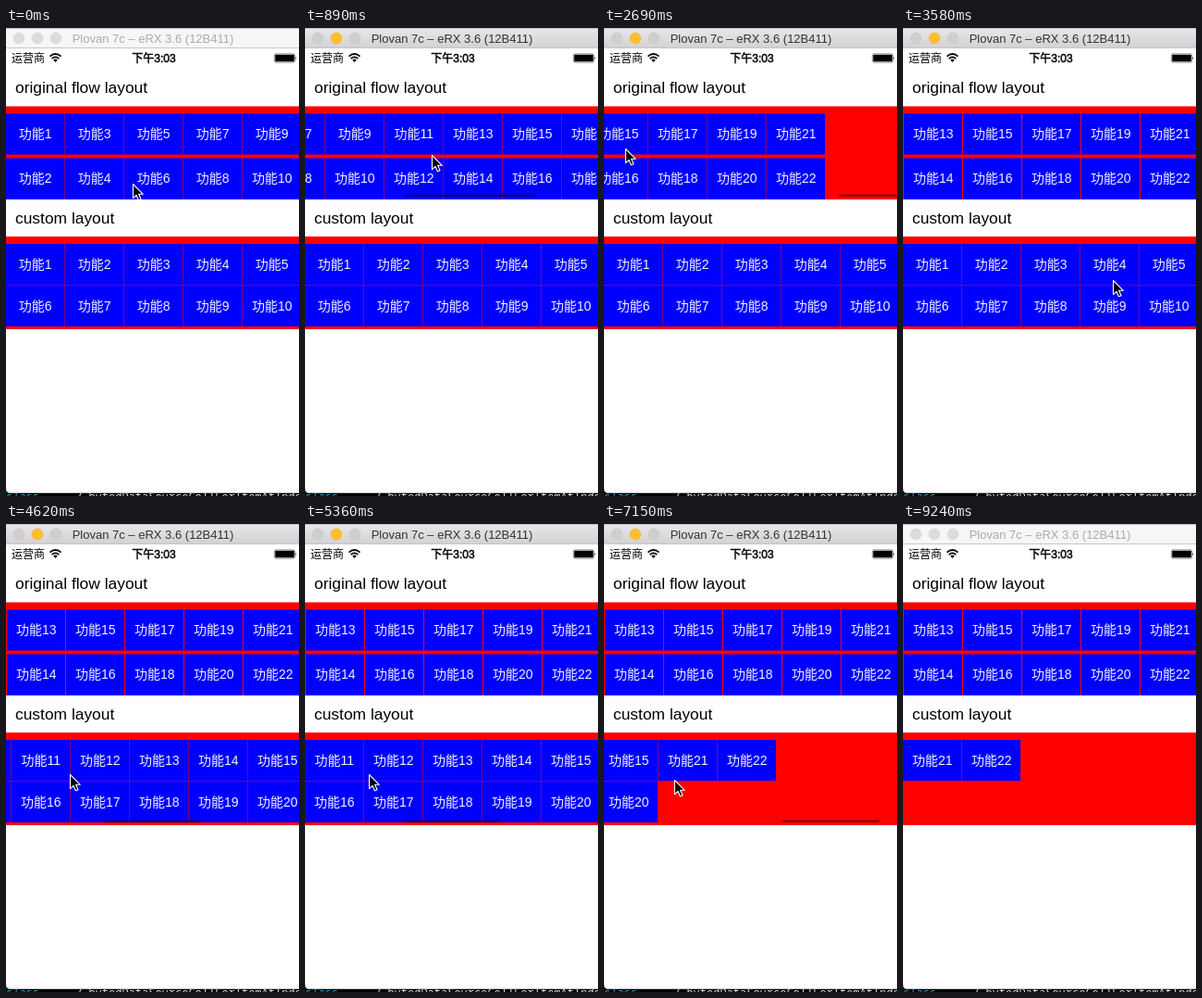
These frames come from a looping animation (317 px wide and 505 px high, 9340 ms). An HTML page:

```html
<!DOCTYPE html>
<html lang="zh-CN">
<head>
<meta charset="utf-8">
<title>Grid layouts</title>
<style>
html, body { margin: 0; width: 100%; height: 100%; overflow: hidden; background: #fff; }
svg { display: block; width: 317px; height: 505px; font-family: "Liberation Sans", "Noto Sans CJK SC", "Noto Sans CJK", sans-serif; }
.bar { fill: #f6f6f6; }
.title { font-size: 13px; fill: #ababab; text-anchor: middle; }
.light { fill: #dcdcdc; stroke: #d2d2d2; stroke-width: .5; }
.active .bar { fill: url(#chrome); }
.active .title { fill: #333; }
.active .light { fill: #d0ced0; stroke: #c2c0c2; }
.active .mid { fill: #fdbd2e; stroke: #f3b02a; }
.status { font-size: 12px; }
.label { font-size: 17.4px; }
.cell { font-size: 14px; font-weight: 300; fill: #f4f4ff; text-anchor: middle; }
.line { fill: #800080; }
.rest .line { fill: #f00; }
.code { font: 12px "Noto Sans Mono", monospace; }
</style>
</head>
<body>
<svg id="stage" viewBox="0 0 317 505">
  <defs>
    <linearGradient id="chrome" x2="0" y2="1">
      <stop stop-color="#e9e7e9"/><stop offset="1" stop-color="#d2d0d2"/>
    </linearGradient>
  </defs>
  <rect width="317" height="505" fill="#000"/>
  <g class="code">
    <text x="0" y="510" fill="#2aa5d8">class</text>
    <text x="75" y="510" fill="#ddd">7.bytedDataSourceCellForItemAtIndex</text>
  </g>
  <path d="M0 0H317V502H5Q0 502 0 497Z" fill="#fff"/>
  <path d="M0 497Q0 501.5 5 501.5H317" fill="none" stroke="#aaa" stroke-width=".7"/>
  <rect class="bar" width="317" height="22"/>
  <path d="M0 .5H317M0 21.5H317" stroke="#c6c6c6"/>
  <circle class="light" cx="14" cy="11" r="6"/>
  <circle class="light mid" cx="34" cy="11" r="6"/>
  <circle class="light" cx="54" cy="11" r="6"/>
  <text class="title" x="159" y="15.6">Plovan 7c – eRX 3.6 (12B411)</text>
  <g class="status">
    <text x="6" y="37">运营商</text>
    <text x="160" y="36.8" text-anchor="middle" stroke="#000" stroke-width=".45">下午3:03</text>
  </g>
  <path d="M47.5 30.6Q53.5 25.4 59.5 30.6M49.7 33Q53.5 29.7 57.3 33" fill="none" stroke="#000" stroke-width="1.7"/>
  <path d="M51.3 34.4Q53.5 32.6 55.7 34.4L53.5 37Z"/>
  <rect x="290.3" y="27.8" width="22.4" height="9.4" rx="1.8" fill="none" stroke="#555" stroke-width=".6"/>
  <rect x="291.2" y="28.7" width="20.6" height="7.6" rx=".8"/>
  <path d="M313.4 30.7Q315 32.5 313.4 34.3Z"/>
  <text class="label" x="10" y="70">original flow layout</text>
  <text class="label" x="10" y="210.5">custom layout</text>
  <rect y="84.5" width="317" height="100.5" fill="#f00"/>
  <rect y="225" width="317" height="100" fill="#f00"/>
  <g id="views"></g>
  <path id="cursor" d="M.5 .5V15.6L4 12.3L6.4 17.8L9 16.7L6.6 11.3H11.3Z" stroke="#fff" stroke-width="1.1" stroke-linejoin="round"/>
</svg>
<script>
const LOOP = 9340, STEP = 149, PAGE = 320, COUNT = 22, COLUMN = 64;
const stage = document.getElementById('stage');
const cursor = document.getElementById('cursor');
const root = document.getElementById('views');

function add(parent, tag, attrs, text) {
  const el = document.createElementNS('http://www.w3.org/2000/svg', tag);
  for (const key in attrs) el.setAttribute(key, attrs[key]);
  if (text) el.textContent = text;
  return parent.appendChild(el);
}

// Drags are press step, release step and resting offset; rows are top and height
const flow = {
  width: 704, end: 383, thumbY: 179.5,
  rows: [[92.5, 44], [140.5, 44.5]],
  place: n => [n >> 1, n % 2],
  drags: [[2, 5, 320], [15, 18, 383]]
};
const paged = {
  width: 960, thumbY: 319.5,
  rows: [[233, 44], [278, 44]],
  place: n => [Math.floor(n / 10) * 5 + n % 5, Math.floor(n % 10 / 5)],
  drags: [[24, 28, 320], [44, 47, 640]]
};
const views = [flow, paged];

for (const view of views) {
  view.group = add(root, 'g', {});
  const cells = Array.from({ length: COUNT }, (_, n) => view.place(n));
  const taken = (col, row) => cells.some(c => c[0] === col && c[1] === row);
  cells.forEach(([col, row], n) => {
    const x = col * COLUMN, [y, height] = view.rows[row];
    add(view.group, 'rect', { x, y, width: COLUMN - 1, height, fill: '#00f' });
    if (taken(col + 1, row)) add(view.group, 'rect', { x: x + COLUMN - 1, y, width: 1, height, class: 'line' });
    if (view === paged && taken(col, row + 1)) add(view.group, 'rect', { x, y: y + height, width: COLUMN, height: 1, class: 'line' });
    add(view.group, 'text', { x: x + 31.7, y: y + 26.9, class: 'cell' }, '功能' + (n + 1));
  });
  view.thumb = add(root, 'rect', { y: view.thumbY, height: 2.5, rx: 1.25, fill: '#000' });
}

// Pointer waypoints: step, x, y
const path = [
  [0, 137, 168], [2, 237, 138], [5, 137, 137], [10, 137, 137], [15, 281, 130],
  [18, 23, 130], [23, 195, 202], [24, 227, 272], [28, 69, 270], [36, 69, 270],
  [39, 304, 296], [43, 302, 295], [47, 76, 275], [49, 76, 276], [56, 90, 520], [64, 90, 520]
];

function pointer(k) {
  const i = path.findIndex(p => p[0] > k);
  const [from, ...a] = path[i - 1], [to, ...b] = path[i];
  return a.map((v, j) => Math.round(v + (b[j] - v) * (k - from) / (to - from)));
}

function rubber(offset, max) {
  const over = offset - max;
  return over > 0 ? max + PAGE * (1 - 1 / (over * .55 / PAGE + 1)) : offset;
}

function scroll(view, k) {
  const max = view.width - PAGE;
  let offset = 0, shown = false;
  for (const [press, release, target] of view.drags) {
    if (k < press) break;
    const drag = pointer(press)[0] - pointer(Math.min(k, release))[0];
    const held = rubber(offset + drag, max);
    const settle = held > max ? 4 : 8; // a bounce is quicker than paging
    const left = Math.max(0, 1 - Math.max(0, k - release) / settle);
    offset = k <= release ? held : target + (held - target) * left ** 7;
    shown = k > press && k <= release + settle;
  }
  return { offset: Math.round(offset), shown };
}

function draw(k) {
  stage.classList.toggle('active', k >= 2 && k < 62);
  for (const view of views) {
    const { offset, shown } = scroll(view, k);
    const max = view.width - PAGE, track = PAGE - 6;
    const over = Math.max(0, offset - max);
    view.group.setAttribute('transform', `translate(${-offset} 0)`);
    view.group.classList.toggle('rest', offset === view.end);
    view.thumb.setAttribute('x', 3 + Math.min(offset, max) / view.width * track + over);
    view.thumb.setAttribute('width', PAGE / view.width * track - over);
    view.thumb.setAttribute('opacity', shown ? .4 : 0);
  }
  cursor.setAttribute('transform', `translate(${pointer(k)})`);
}

let last = -1;
function tick() {
  const k = Math.floor((performance.now() % LOOP + 5) / STEP);
  if (k !== last) draw(last = k);
  requestAnimationFrame(tick);
}
tick();
</script>
</body>
</html>
```
